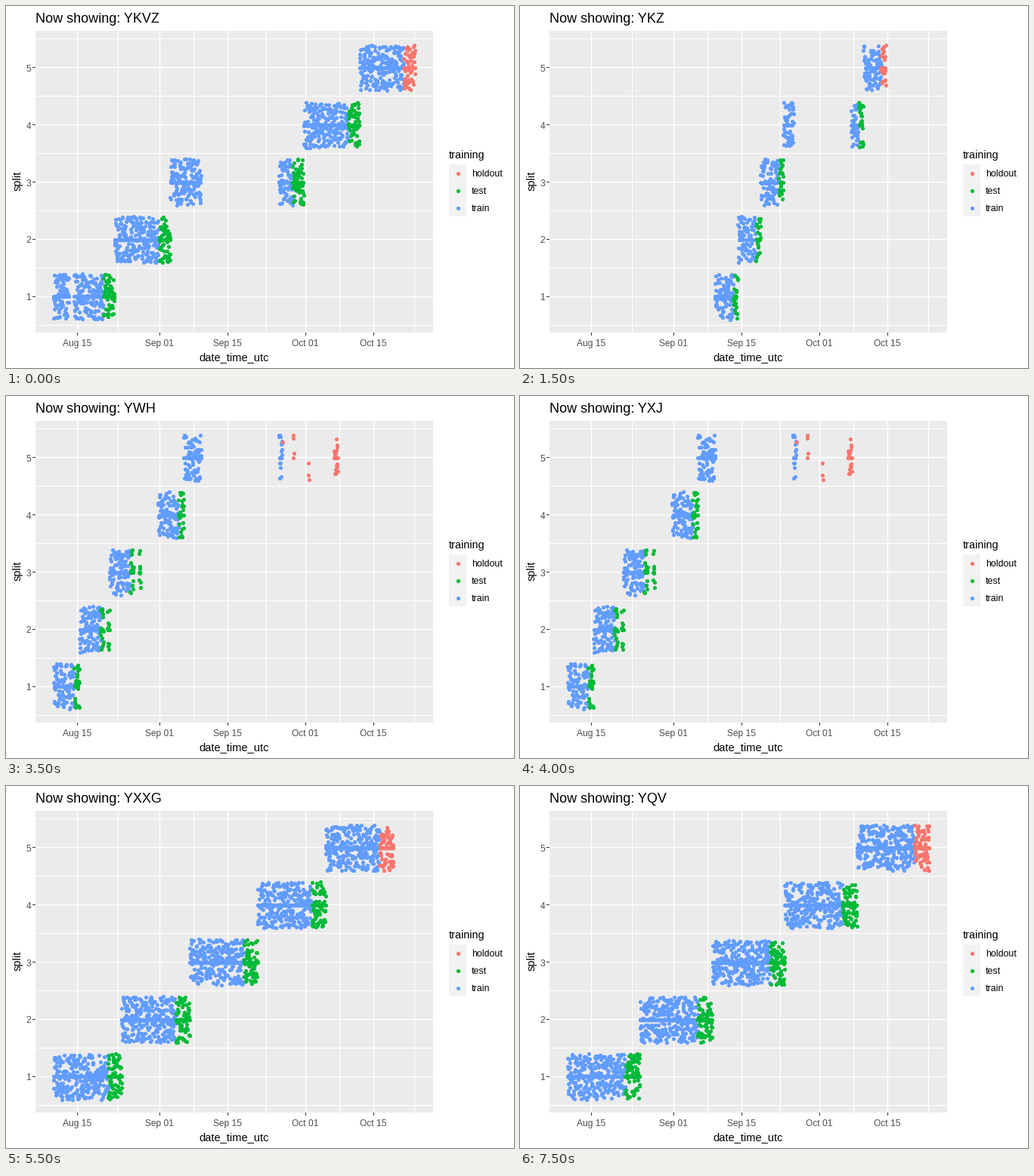
Write a matplotlib script that moves like this. It is 672 px wide and 480 px high and loops after 8 s.

```python
import math

import numpy as np
import matplotlib.pyplot as plt
from matplotlib.animation import FuncAnimation
from matplotlib.patches import Rectangle

W, H, DPI = 672, 480, 96
PX = 72 / DPI
LEFT, TOP, RIGHT, BOTTOM = 39, 33, 565, 433
START, END = 63, 541.3
SPLITS = 5
DOT = 5.2 * PX
COLORS = {"holdout": "#F8766D", "test": "#00BA38", "train": "#619CFF"}
CODES = ["YKVZ", "YKZ", "YWK", "YWH", "YXJ", "YXXG", "YGXV", "YQV"]
TICKS = {"Aug 15": 0, "Sep 01": 17, "Sep 15": 31, "Oct 01": 47, "Oct 15": 61}

# Active spells of each series, as alternating on and off positions
SPELLS = [
    (START, 83, 90, 258, 361, END),
    (START, END),
    (258, 362, 438, 484),
    (START, 74, 101, 255, 266, 266.5, 303, 309, 320, 338, 343, 361),
    (START, 129, 134, 169, 176, 178, 201, 258, 361, 366,
     380, 380.6, 400, 400.6, 434, 439),
    (START, 512.5),
    (START, 512.5),
    (START, 83, 94, 138, 148, 258, 365, 440, 451, 467, 478, END),
    (START, END),
]

plt.rcParams["font.family"] = "Liberation Sans"


def day_x(day):
    return 94.2 + 6.425 * day


def split_y(n):
    return 461.3 - 75.9 * n


def build(seed, spells):
    """Cut the active time into equal splits, the last fifth of each held back."""
    rng = np.random.default_rng(seed)
    times = np.concatenate([np.arange(a, b, 0.28)
                            for a, b in zip(spells[::2], spells[1::2])])
    keep = len(times) / 2200
    groups = {role: [] for role in COLORS}
    for n, block in enumerate(np.array_split(times, SPLITS), 1):
        cut = int(0.8 * len(block))
        late = "holdout" if n == SPLITS else "test"
        for role, x in (("train", block[:cut]), (late, block[cut:])):
            centre = x[rng.random(len(x)) < keep]
            jitter = rng.uniform(-30.4, 30.4, len(x))
            groups[role].append((centre, np.full(len(centre), split_y(n))))
            groups[role].append((x, split_y(n) + jitter))
    return {role: np.hstack(parts) for role, parts in groups.items()}


clouds = [build(i + 1, s) for i, s in enumerate(SPELLS)]

fig = plt.figure(figsize=(W / DPI, H / DPI), dpi=DPI, facecolor="white")
ax = fig.add_axes([0, 0, 1, 1])
ax.set(xlim=(0, W), ylim=(H, 0))
ax.axis("off")


def rect(x, y, w, h, color):
    ax.add_patch(Rectangle((x, y), w, h, facecolor=color, lw=0, zorder=0))


def line(xs, ys, color, width):
    ax.plot(xs, ys, color=color, lw=width * PX, zorder=1,
            solid_capstyle="butt", snap=False)


def vline(x, y0=TOP, y1=BOTTOM, color="white", width=1):
    x = math.floor(x) + 0.5
    line((x, x), (y0, y1), color, width)


def hline(y, x0=LEFT, x1=RIGHT, color="white", width=1):
    y = math.floor(y) + 0.5
    line((x0, x1), (y, y), color, width)


def label(x, y, s, size, color="black", **kw):
    return ax.text(x, y, s, fontsize=size * PX, color=color, **kw)


rect(LEFT, TOP, RIGHT - LEFT, BOTTOM - TOP, "#EBEBEB")

days = [*TICKS.values(), 78]
for a, b in zip(days, days[1:]):
    vline(day_x((a + b) / 2))
for n in range(SPLITS + 1):
    hline(split_y(n + 0.5))

for name, day in TICKS.items():
    x = day_x(day)
    vline(x, width=1.42)
    vline(x, BOTTOM, BOTTOM + 4, "#333333")
    label(x, 451, name, 12, "#4D4D4D", ha="center")
for n in range(1, SPLITS + 1):
    y = split_y(n)
    hline(y, width=1.42)
    hline(y, LEFT - 4, LEFT, "#333333")
    label(33, y + 5, str(n), 12, "#4D4D4D", ha="right")

label(301.7, 470, "date_time_utc", 14.6, ha="center")
label(23, 231.5, "split", 14.67, rotation=90, ha="right", va="center")

label(585.5, 202, "training", 14.4)
rect(586, 210, 23, 69, "#F2F2F2")
for i, (role, color) in enumerate(COLORS.items()):
    y = 221.5 + 23 * i
    ax.plot(598, y, "o", ms=DOT, mew=0, color=color)
    label(616, y + 4.5, role, 12.4)

dots = {role: ax.plot([], [], "o", ms=DOT, mew=0, color=COLORS[role], zorder=z)[0]
        for z, role in enumerate(("train", "test", "holdout"), 3)}
title = label(39, 22, "", 18)


def draw(i):
    # The points switch half a step ahead of the title
    for role, xy in clouds[(i + 1) // 2].items():
        dots[role].set_data(*xy)
    title.set_text("Now showing: " + CODES[i // 2])
    return [*dots.values(), title]


anim = FuncAnimation(fig, draw, frames=2 * len(CODES), init_func=lambda: draw(0),
                     interval=500, repeat=True, repeat_delay=0)
plt.show()
```
